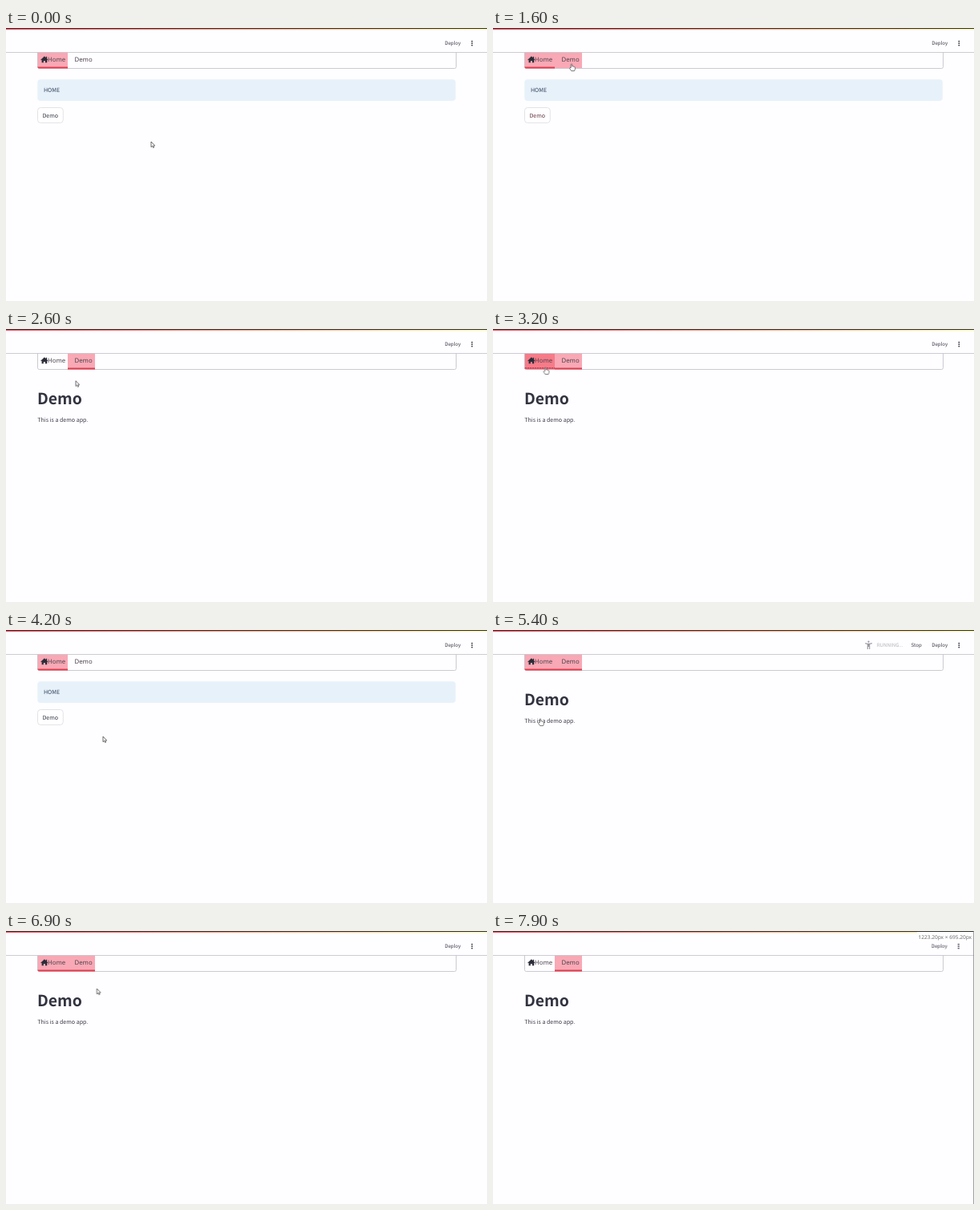
These frames come from a looping animation (600 by 341 pixels, 8 s). An HTML page:

```html
<!DOCTYPE html>
<html lang="en">
<head>
<meta charset="utf-8">
<title>Navigation bar demo</title>
<style>
html, body { margin: 0; width: 100%; height: 100%; overflow: hidden; background: #fefdff; }
svg { display: block; width: 600px; height: 341px; }
text { font-family: "Noto Sans CJK JP", "Noto Sans CJK SC", "Noto Sans CJK", sans-serif; fill: #3b3d48; text-rendering: geometricPrecision; }
.body { font-size: 7.08px; }
.small { font-size: 6.15px; }
.tab { font: 7.8px "Noto Sans", sans-serif; fill: #4b444c; }
.title { font-size: 19.4px; font-weight: 700; fill: #31333f; }

/* 1.25% of the loop is one 100 ms step */
.anim { animation: 8s step-end infinite; }
#home { animation-name: home; }
#demo { animation-name: demo; }
#running { animation-name: running; }
#homeTab { animation-name: homeTab; }
#demoTab { animation-name: demoTab; }
#homeLine { animation-name: homeLine; }
#demoLine { animation-name: demoLine; }
#homeFocus { animation-name: homeFocus; }
#demoFocus { animation-name: demoFocus; }
#button { animation-name: button; }
#buttonText { animation-name: buttonText; }
#header { animation-name: header; }
#resize { animation-name: resize; }
#cursor { animation-name: path; }
#arrow { animation-name: arrow; }
#hand { animation-name: hand; }
#beam { animation-name: beam; }

@keyframes home { 0%, 42.5% { opacity: 1 } 22.5%, 67.5%, 100% { opacity: 0 } }
@keyframes demo { 0%, 42.5% { opacity: 0 } 22.5%, 67.5%, 100% { opacity: 1 } }
@keyframes running {
  0%, 28.75%, 45%, 73.75%, 100% { opacity: 0 }
  22.5%, 41.25%, 67.5% { opacity: 1 }
  27.5%, 43.75%, 71.25% { opacity: .5 }
}
@keyframes homeTab {
  0%, 37.5%, 46.25% { fill: #f9a8b5 }
  22.5% { fill: #f8ccd4 }
  23.75% { fill: #f6edf0 }
  25%, 96.25%, 100% { fill: #fefdff }
  40% { fill: #f67b89 }
}
@keyframes demoTab {
  0%, 46.25% { fill: #fefdff }
  18.75%, 27.5%, 67.5%, 100% { fill: #f9a8b5 }
  21.25% { fill: #f67b89 }
  42.5% { fill: #f8ccd4 }
  43.75% { fill: #f6edf0 }
}
@keyframes homeLine { 0%, 46.25% { opacity: 1 } 22.5% { opacity: .25 } 25%, 96.25%, 100% { opacity: 0 } 40% { opacity: .5 } }
@keyframes demoLine { 0%, 46.25% { opacity: 0 } 22.5% { opacity: .5 } 27.5%, 67.5%, 100% { opacity: 1 } 42.5% { opacity: .25 } }
@keyframes homeFocus { 0%, 46.25%, 100% { opacity: 0 } 40% { opacity: 1 } }
@keyframes demoFocus { 0%, 27.5%, 100% { opacity: 0 } 22.5% { opacity: 1 } }
@keyframes button { 0%, 17.5%, 67.5%, 100% { stroke: #dcdce3 } 12.5%, 61.25% { stroke: #ff6b6b } }
@keyframes buttonText { 0%, 22.5%, 67.5%, 100% { fill: #3b3d48 } 12.5%, 61.25% { fill: #ff4b4b } 17.5% { fill: #673a45 } }
@keyframes header { 0% { transform: none } 96.25%, 100% { transform: translateX(-.5px) } }
@keyframes resize { 0% { opacity: 0 } 96.25%, 100% { opacity: 1 } }
@keyframes path {
  0% { transform: translate(181px, 142px); animation-timing-function: steps(5) }
  6.25% { transform: translate(110px, 128px); animation-timing-function: steps(4) }
  11.25% { transform: translate(52px, 108px); animation-timing-function: steps(3) }
  15% { transform: translate(56px, 119px); animation-timing-function: steps(3) }
  18.75% { transform: translate(96px, 47px) }
  20%, 25% { transform: translate(98px, 45px); animation-timing-function: steps(4) }
  30% { transform: translate(105px, 70px); animation-timing-function: steps(3) }
  33.75% { transform: translate(78px, 62px); animation-timing-function: steps(3) }
  37.5%, 42.5% { transform: translate(65.5px, 48px); animation-timing-function: steps(2) }
  45% { transform: translate(84px, 118px); animation-timing-function: steps(3) }
  48.75% { transform: translate(134px, 127px); animation-timing-function: steps(3) }
  52.5%, 56.25% { transform: translate(121px, 133px); animation-timing-function: steps(5) }
  62.5% { transform: translate(60px, 115px) }
  63.75%, 70% { transform: translate(59px, 111px) }
  71.25% { transform: translate(59px, 114px); animation-timing-function: steps(3) }
  75%, 77.5% { transform: translate(72px, 84px); animation-timing-function: steps(2) }
  80%, 85% { transform: translate(60px, 44px); animation-timing-function: steps(3) }
  88.75% { transform: translate(220px, 128px); animation-timing-function: steps(5) }
  93.75%, 100% { transform: translate(593px, 110px) }
}
@keyframes arrow {
  0%, 15%, 26.25%, 43.75%, 86.25% { opacity: 1 }
  12.5%, 18.75%, 37.5%, 61.25%, 95%, 100% { opacity: 0 }
}
@keyframes hand {
  0%, 15%, 26.25%, 43.75%, 68.75%, 86.25%, 100% { opacity: 0 }
  12.5%, 18.75%, 37.5%, 61.25%, 80% { opacity: 1 }
}
@keyframes beam { 0%, 80%, 100% { opacity: 0 } 68.75% { opacity: 1 } }
</style>
</head>
<body>
<svg viewBox="0 0 600 341">
  <defs>
    <linearGradient id="stripe">
      <stop offset="0" stop-color="#ff4b5f"/>
      <stop offset="1" stop-color="#fff3a0"/>
    </linearGradient>
  </defs>
  <rect width="600" height="341" fill="#fefdff"/>

  <!-- navigation bar -->
  <g shape-rendering="crispEdges">
    <rect id="homeTab" class="anim" x="39" y="30" width="38" height="20"/>
    <rect id="demoTab" class="anim" x="77" y="30" width="34" height="20"/>
  </g>
  <path d="M39.5 30V48.5Q39.5 50.5 41.5 50.5H559.5Q561.5 50.5 561.5 48.5V30" fill="none" stroke="#c6c4ca" stroke-width=".9"/>
  <g fill="#e23c4e">
    <path id="homeLine" class="anim" d="M39.3 48.5H77V50.6H40.5Z"/>
    <path id="demoLine" class="anim" d="M77 48.5H111V50.6H77Z"/>
  </g>
  <g stroke="#c0364a" stroke-dasharray="2 1">
    <path id="homeFocus" class="anim" d="M40 48.7H77"/>
    <path id="demoFocus" class="anim" d="M78 48.7H111"/>
  </g>
  <path d="M43.2 39.7L47.9 35.3L49.8 37V35.8H51.1V38.2L52.5 39.7L51.9 40.3L51.2 39.7V43.2H49V40.9H46.8V43.2H44.6V39.7L43.8 40.3Z" fill="#2b2d38"/>
  <text class="tab" x="51.9" y="42.1">Home</text>
  <text class="tab" x="85.5" y="42.1">Demo</text>

  <!-- pages -->
  <g id="home" class="anim">
    <rect x="39.3" y="64.3" width="521.5" height="26.8" rx="4" fill="#e7f1fa"/>
    <text class="body" x="46.9" y="80.4" style="fill:#34425c">HOME</text>
    <rect id="button" class="anim" x="39.5" y="99.5" width="31.8" height="19" rx="3.8" fill="#fff" stroke="#dcdce3" stroke-width=".8"/>
    <text id="buttonText" class="body anim" x="45.4" y="111.8">Demo</text>
  </g>
  <g id="demo" class="anim">
    <text class="title" x="38.9" y="93.8">Demo</text>
    <text class="body" x="39.2" y="116.3">This is a demo app.</text>
  </g>

  <!-- header -->
  <rect width="600" height="1" fill="#34322f"/>
  <rect y="1" width="600" height="1.2" fill="url(#stripe)"/>
  <path d="M0 30.5H600" stroke="#c9c7cd" stroke-width=".9"/>
  <g id="running" class="anim">
    <g fill="none" stroke="#96959d" stroke-width="1.1">
      <path d="M464.3 16.6L467 17.2H470L472.8 16.6M467.3 17.2V24M469.7 17.2V24M468.5 17V21"/>
      <circle cx="468.5" cy="14.6" r=".55"/>
    </g>
    <text class="small" x="478.7" y="21" style="fill:#b3b2b9">RUNNING...</text>
    <text class="small" x="521.5" y="21">Stop</text>
  </g>
  <g id="header" class="anim">
    <text class="small" x="547.2" y="21.1">Deploy</text>
    <g fill="#31333f">
      <circle cx="581.3" cy="16.6" r=".95"/>
      <circle cx="581.3" cy="19.1" r=".95"/>
      <circle cx="581.3" cy="21.6" r=".95"/>
    </g>
  </g>
  <g id="resize" class="anim">
    <rect x="529" y="1" width="71" height="12" fill="#fff" fill-opacity=".85"/>
    <text x="530.5" y="10.1" style="font:6.55px 'Noto Sans',sans-serif;fill:#6b6a70">1223.20px × 695.20px</text>
    <rect x="599.2" width=".8" height="341" fill="#8b898f"/>
  </g>

  <!-- pointer -->
  <g id="cursor" class="anim">
    <path id="arrow" class="anim" d="M0 0V6.7L1.5 5.4L2.6 7.6L3.7 7.1L2.7 5H4.7Z" fill="#fff" stroke="#333" stroke-width=".7"/>
    <path id="hand" class="anim" d="M-.8 4.7V.4Q0 -.7 .8 .4V3Q1.6 2.4 2.2 3.2Q3.1 2.8 3.5 3.6Q4.3 3.4 4.4 4.4V6.4L3.5 8.6H-.3L-2.4 5.5Q-2.3 4.1 -.8 4.7Z" fill="#fff" stroke="#444" stroke-width=".7"/>
    <path id="beam" class="anim" d="M-1 -2.8H1M0 -2.8V2.8M-1 2.8H1" fill="none" stroke="#555" stroke-width=".8"/>
  </g>
</svg>
</body>
</html>
```
